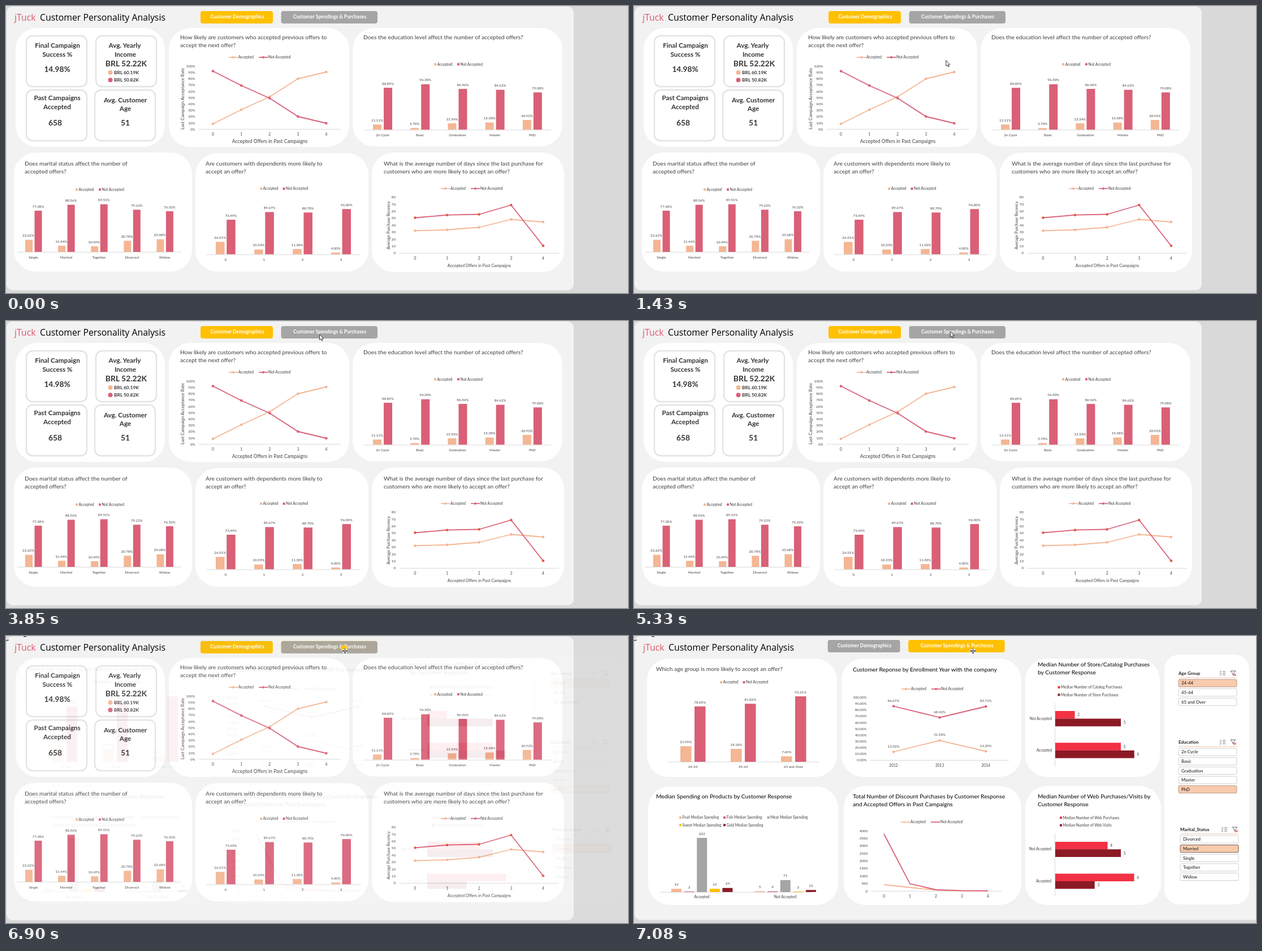
Write an HTML page that moves like this. It is 1100x509 px and loops after 8000 ms.

```html
<!DOCTYPE html>
<html lang="en">
<head>
<meta charset="utf-8">
<title>Customer Personality Analysis</title>
<style>
html, body { margin: 0; width: 100%; height: 100%; overflow: hidden; background: #d9d9d9; }
svg { display: block; font-family: Lato, "Noto Sans", sans-serif; }
.title { font-family: "Open Sans", "Noto Sans", sans-serif; }
</style>
</head>
<body>
<svg id="stage" width="1100" height="509" viewBox="0 0 1100 509"></svg>
<script>
const LOOP = 8000;
const PEACH = '#f4b693', ROSE = '#d96077', GREY = '#a5a5a5', GOLD = '#ffc000',
      RED = '#f23144', WINE = '#8c1a25', INK = '#404040', AXIS = '#d9d9d9';
const PAIR = ['Accepted', 'Not Accepted'];
const stage = document.getElementById('stage');
let layer = stage;

function add(tag, attrs, parent = layer) {
  const el = document.createElementNS('http://www.w3.org/2000/svg', tag);
  for (const key in attrs) el.setAttribute(key, attrs[key]);
  return parent.appendChild(el);
}
const group = (attrs = {}, parent = stage) => add('g', attrs, parent);
const rect = (x, y, width, height, fill, more) => add('rect', { x, y, width, height, fill, ...more });
const path = (d, stroke, width = 1, more) =>
  add('path', { d, fill: 'none', stroke, 'stroke-width': width, ...more });

// y is the middle of the capitals
function text(x, y, str, size, more = {}) {
  const el = add('text', { x, y: y + size * .36, 'font-size': size, fill: INK, ...more });
  el.textContent = str;
  return el;
}
const mid = (x, y, str, size = 6.2, more) => text(x, y, str, size, { 'text-anchor': 'middle', ...more });
const right = (x, y, str, size = 6.2) => text(x, y, str, size, { 'text-anchor': 'end' });
const bold = (x, y, str, size) => mid(x, y, str, size, { 'font-weight': 700, fill: '#333' });
const upright = (x, y, str, size) => mid(x, y, str, size, { transform: `rotate(-90 ${x} ${y})` });
const heading = (x, y, lines, fill = '#000') =>
  lines.forEach((line, i) => text(x, y + i * 14, line, 10.28, { fill }));

const card = (x1, y1, x2, y2, rx = 38) => rect(x1, y1, x2 - x1, y2 - y1, '#fff', { rx });
const key = (x, y, fill, label) => {
  rect(x, y - 2, 4, 4, fill);
  text(x + 5.5, y, label, 6.55);
};
const barKeys = (xa, xb, y) => { key(xa, y, PEACH, PAIR[0]); key(xb, y, ROSE, PAIR[1]); };
function lineKeys(xa, xb, y, dots = true) {
  [[xa, PEACH], [xb, ROSE]].forEach(([x, color], i) => {
    path(`M${x} ${y}h16.5`, color, 1.7);
    if (dots) add('circle', { cx: x + 8, cy: y, r: 2, fill: color });
    text(x + 17, y, PAIR[i], 6.55);
  });
}
const baseline = (x1, x2, y) => path(`M${x1} ${y}H${x2}`, AXIS);

function columns({ x, gap, shift, width, base, scale, low, high, names, nameX, nameY, skew = 0 }) {
  names.forEach((name, i) => {
    [[low, PEACH, 0], [high, ROSE, shift]].forEach(([values, color, dx]) => {
      const left = x + i * gap + dx, h = values[i] * scale;
      rect(left, base - h, width, h, color);
      mid(left + width / 2 + (dx ? 0 : skew), base - h - 7.6, values[i].toFixed(2) + '%');
    });
    mid(nameX + i * gap, nameY, name);
  });
}
function line(x, gap, ys, color, dot = color) {
  const pts = ys.map((y, i) => [x + i * gap, y]);
  path('M' + pts.join('L'), color, 1.8, { 'stroke-linejoin': 'round' });
  if (dot) pts.forEach(([cx, cy]) => add('circle', { cx, cy, r: 2.3, fill: dot }));
}
const scaleLabels = (x, y, step, count, label) => {
  for (let i = 0; i < count; i++) right(x, y + i * step, label(i));
};
const numbers = (x, gap, y, count, first = 0) => {
  for (let i = 0; i < count; i++) mid(x + i * gap, y, first + i, 6.6);
};

function header(x, y, dy, leftFill, rightFill) {
  text(x, y, 'jTuck', 15.8, { class: 'title', fill: '#e0566c' });
  text(x + 45, y, 'Customer Personality Analysis', 15.8, { class: 'title', fill: '#000' });
  const white = { 'font-weight': 700, fill: '#fff' };
  rect(344 + dy * .7, 9 + dy, 128, 22, leftFill, { rx: 4 });
  rect(486.5 + dy * .7, 9 + dy, 170.5, 22, rightFill, { rx: 4 });
  mid(409 + dy * .7, 19.3 + dy, 'Customer Demographics', 8.7, white);
  mid(572.5 + dy * .7, 19.3 + dy, 'Customer Spendings & Purchases', 8.7, white);
}

function demographics() {
  rect(0, 0, 1100, 509, '#d9d9d9');
  rect(1, 1, 1003, 503, '#f2f2f2', { rx: 11 });
  header(15, 20, 0, GOLD, GREY);
  card(17, 39, 281, 250); card(288, 39, 607, 250); card(613, 39, 984, 249);
  card(14, 260, 329, 471); card(335, 261, 641, 471); card(647, 260, 987, 472);

  [[36, 53], [159, 53], [36, 149], [157, 149]].forEach(([x, y]) =>
    rect(x, y, 107, 90, '#fff', { rx: 11, stroke: '#e3e3e3', 'stroke-width': 2.4 }));
  bold(91, 70, 'Final Campaign', 11.7); bold(91, 85.5, 'Success %', 11.7); bold(90.5, 112, '14.98%', 13.7);
  bold(210, 70, 'Avg. Yearly', 11.7); bold(211, 85.5, 'Income', 11.7); bold(212.5, 102, 'BRL 52.22K', 13.9);
  [[118, PEACH, 'BRL 60.19K'], [131.3, ROSE, 'BRL 50.82K']].forEach(([y, fill, label]) => {
    add('circle', { cx: 184.5, cy: y, r: 4, fill });
    bold(213, y, label, 8.3);
  });
  bold(90.5, 163, 'Past Campaigns', 11.7); bold(90.5, 178.5, 'Accepted', 11.7); bold(87, 207, '658', 13.8);
  bold(211, 166.5, 'Avg. Customer', 11.7); bold(211, 182, 'Age', 11.7); bold(211, 207, '51', 13.8);

  heading(308, 55.5, ['How likely are customers who accepted previous offers to', 'accept the next offer?'], INK);
  lineKeys(394, 447, 91);
  scaleLabels(334.5, 106.5, 11.2, 11, i => 100 - i * 10 + '%');
  upright(312, 164.5, 'Last Campaign Acceptance Rate', 7.8);
  baseline(341, 592, 218.5);
  line(366, 50.1, [209, 184, 161, 129, 117], PEACH);
  line(366, 50.1, [115.5, 141, 163.5, 196, 208], ROSE);
  numbers(366, 50.1, 227.5, 5);
  mid(466.5, 240, 'Accepted Offers in Past Campaigns', 8.7);

  heading(632, 55.5, ['Does the education level affect the number of accepted offers?'], INK);
  barKeys(757, 798, 103.3);
  columns({ x: 649, gap: 66.2, shift: 19, width: 15, base: 219.5, scale: .838, nameX: 666, nameY: 228.7,
    low: [11.11, 3.7, 13.54, 15.38, 20.92], high: [88.89, 96.3, 86.46, 84.62, 79.08],
    names: ['2n Cycle', 'Basic', 'Graduation', 'Master', 'PhD'] });
  baseline(633, 964, 220);

  heading(33, 279, ['Does marital status affect the number of', 'accepted offers?'], INK);
  barKeys(123, 164, 325.5);
  columns({ x: 34, gap: 58.1, shift: 16.5, width: 13, base: 436, scale: .943, nameX: 48.3, nameY: 445.3, skew: -1,
    low: [22.62, 11.44, 10.49, 20.78, 23.68], high: [77.38, 88.56, 89.51, 79.22, 76.32],
    names: ['Single', 'Married', 'Together', 'Divorced', 'Widow'] });
  baseline(20, 310, 436.5);

  heading(353, 279, ['Are customers with dependents more likely to', 'accept an offer?'], INK);
  barKeys(449, 489.5, 324);
  columns({ x: 371, gap: 68.1, shift: 19.2, width: 15.5, base: 440.5, scale: .837, nameX: 388.3, nameY: 449.8,
    low: [26.51, 10.33, 11.3, 4], high: [73.49, 89.67, 88.7, 96], names: [0, 1, 2, 3] });
  baseline(354, 627, 441);

  heading(668, 279, ['What is the average number of days since the last purchase for',
    'customers who are more likely to accept an offer?'], INK);
  lineKeys(769, 822, 323.7);
  scaleLabels(689, 339, 12.4, 9, i => 80 - i * 10);
  upright(676, 389, 'Average Purchase Recency', 7.3);
  baseline(696, 978, 438.5);
  line(723.5, 56.6, [398.5, 397, 392.5, 378.5, 383], PEACH);
  line(723.5, 56.6, [375.5, 370.7, 369.5, 353, 425.3], ROSE, '#e05a48');
  numbers(723.5, 56.6, 447.5, 5);
  mid(837, 460, 'Accepted Offers in Past Campaigns', 7.3);
}

function barPairs(x, bars, nameX, nameYs) {
  bars.forEach(([y, width, label, fill]) => {
    rect(x, y, width, 13.6, fill);
    mid(x + width + 6.6, y + 7, label, 6.6);
  });
  right(nameX, nameYs[0], PAIR[1], 6.55);
  right(nameX, nameYs[1], PAIR[0], 6.55);
}

function slicer(x, y, name, items, chosen, edge) {
  text(x, y, name, 8, { 'font-weight': 700, fill: '#222' });
  path(`M${x} ${y + 8}h103`, '#f3c3a5');
  [-3, 0, 3].forEach(dy =>
    path(`M${x + 73} ${y + dy}l1 1 2-2m2 1h5`, '#555', .8));
  path(`M${x + 92} ${y - 4}h9l-3.5 4v4l-2 -1.5v-2.500z`, '#555', .9);
  path(`M${x + 98} ${y + 1}l4 4m0-4l-4 4`, '#d0433c', 1);
  items.forEach((item, i) => {
    const cy = y + 17.6 + i * 16.6, on = item === chosen;
    rect(x, cy - 6.6, 103, 13.2, on ? '#f8cbad' : '#fff',
      { rx: 2, stroke: on ? edge : '#cfcfcf', 'stroke-width': 1 });
    text(x + 5, cy, item, 7.8, { fill: '#111' });
  });
}

function spendings() {
  rect(0, 0, 1100, 509, '#d9d9d9');
  rect(1, 0, 1130, 503.5, '#f2f2f2', { rx: 11 });
  header(16, 20.5, -2, GREY, GOLD);
  card(23, 40, 359, 250); card(367, 40, 685, 250); card(692, 40, 930, 250);
  card(25, 267, 361, 477); card(371, 266, 685, 477); card(692, 266, 932, 477);
  card(938, 33, 1088, 476, 26);

  heading(39, 58.5, ['Which age group is more likely to accept an offer?'], INK);
  barKeys(152, 192.500, 82);
  columns({ x: 82, gap: 89, shift: 25, width: 19.5, base: 223, scale: 1.257, nameX: 104, nameY: 232,
    low: [21.95, 18.18, 7.69], high: [78.05, 81.82, 92.31], names: ['24-44', '45-64', '65 and Over'] });
  baseline(60, 327, 223.5);

  heading(387, 59, ['Customer Reponse by Enrollment Year with the company']);
  lineKeys(473, 526, 94);
  scaleLabels(411.5, 109, 11.08, 11, i => (100 - i * 10).toFixed(2) + '%');
  baseline(418, 663, 220.5);
  [[[205.5, 185.3, 204.5], PEACH, ['13.33%', '31.58%', '14.29%']],
   [[124.500, 144.5, 125], ROSE, ['86.67%', '68.42%', '85.71%']]].forEach(([ys, color, labels]) => {
    line(459, 81.6, ys, color);
    ys.forEach((y, i) => mid(459 + i * 81.6, y - 10.2, labels[i]));
  });
  numbers(459, 81.6, 229.5, 3, 2012);

  heading(714, 50.5, ['Median Number of Store/Catalog Purchases', 'by Customer Response']);
  key(749.5, 91, RED, 'Median Number of Catalog Purchases');
  key(749.5, 104.3, WINE, 'Median Number of Store Purchases');
  path('M744.5 119V231', AXIS);
  barPairs(745, [[133, 34.5, 2, RED], [146.6, 116, 5, WINE], [189.3, 116, 5, RED], [203, 139.7, 6, WINE]],
    739, [146.5, 203]);

  heading(39, 284, ['Median Spending on Products by Customer Response']);
  const products = [['Fruit', PEACH, 80, 322], ['Fish', ROSE, 158, 322], ['Meat', GREY, 235.5, 322],
    ['Sweet', GOLD, 80, 335.3], ['Gold', WINE, 158, 335.3]];
  products.forEach(([name, fill, x, y]) => key(x, y, fill, name + ' Median Spending'));
  [[66, [19, 3, 322, 19, 24]], [213.5, [5, 4, 71, 3, 12]]].forEach(([x, values], n) => {
    values.forEach((v, i) => {
      const left = x + i * 22.6, h = v * .298;
      rect(left, 454 - h, 18, h, products[i][1]);
      mid(left + 9, 454 - h - 7.7, v, 6.4);
    });
    mid(x + 54, 463, PAIR[n], 6.55);
  });
  baseline(47, 313, 454.5);

  heading(387, 284, ['Total Number of Discount Purchases by Customer Response',
    'and Accepted Offers in Past Campaigns']);
  lineKeys(472, 525, 330, false);
  scaleLabels(413, 345.5, 13.35, 9, i => 4000 - i * 500);
  baseline(419, 650, 452.5);
  line(442, 46, [441, 446, 450.7, 451.8, 452], PEACH, null);
  line(442, 46, [351, 439.3, 450, 451.6, 452], ROSE, null);
  numbers(442, 46, 461.5, 5);

  heading(714, 284, ['Median Number of Web Purchases/Visits by', 'Customer Response']);
  key(753, 322.3, RED, 'Median Number of Web Purchases');
  key(753, 335.700, WINE, 'Median Number of Web Visits');
  path('M744.5 350V462', AXIS);
  barPairs(745, [[365, 92.5, 4, RED], [378.3, 116, 5, WINE], [421.5, 139.5, 6, RED], [434.8, 69.7, 3, WINE]],
    738, [378, 434.5]);

  slicer(963, 66, 'Age Group', ['24-44', '45-64', '65 and Over'], '24-44', '#b9998a');
  slicer(963, 188, 'Education', ['2n Cycle', 'Basic', 'Graduation', 'Master', 'PhD'], 'PhD', '#b9998a');
  slicer(966, 343, 'Marital_Status', ['Divorced', 'Married', 'Single', 'Together', 'Widow'], 'Married', '#6f5a50');
}

// steps: [time, value], held unless an easing is given
function play(el, prop, steps, easing = 'steps(1, end)') {
  const all = [[0, steps[0][1]], ...steps, [LOOP, steps.at(-1)[1]]];
  el.animate(all.map(([t, value]) => ({ offset: t / LOOP, [prop]: value, easing })),
    { duration: LOOP, iterations: Infinity });
}
const show = (el, from, to) => play(el, 'opacity', [[0, 0], [from, 1], [to, 0]]);

demographics();
layer = group();
spendings();
play(layer, 'opacity', [[0, 0], [6900, .08], [6990, .32], [7080, 1]]);

layer = group();
path('M0 8.5l5-1.500M31 .8h5', '#222', 1.2);
show(layer, 6350, LOOP);

layer = group();
path('M664 39.500q4-2.500 7-1', '#fff3b0', 2);
show(layer, 6090, 6690);

layer = group();
add('circle', { cx: 598, cy: 22, r: 6, fill: '#ffc61a' });
show(layer, 6900, 7080);

const cursor = group();
layer = group({}, cursor);
path('M.5 .5V10.500l2.300-2 1.600 3.500 1.700-.8-1.600-3.300h3z', '#222', .9, { fill: '#fff' });
show(layer, 70, 5880);
layer = group({}, cursor);
path('M3.200 8V1.500q1-1.500 2 0V5q3.500 0 5 1.200V10q-.500 2-1.500 4H4.500L.8 9q.6-1.500 2.400-.3', '#222', .9, { fill: '#fff' });
show(layer, 5880, 6800);
layer = group({}, cursor);
path('M.5 .5V9l2-1.800h4z', '#222', .8, { fill: '#fff' });
path('M-2 5.500h9M2.500 1v9M-2 5.500l1.500-1.500v3zM7 5.500l-1.500-1.500v3zM2.500 10l-1.500-1.500h3z', '#fff', 2.4);
path('M-2 5.500h9M2.500 1v9M-2 5.500l1.500-1.500v3zM7 5.500l-1.500-1.500v3zM2.500 10l-1.500-1.500h3z', '#222', .9);
show(layer, 6800, LOOP);

const route = [
  [60, 1092, 508], [820, 625, 144], [970, 551, 97], [1400, 551, 97], [1430, 551, 96],
  [1640, 592, 88], [1840, 594, 66], [2110, 594, 66], [2390, 546, 52], [2570, 554, 39],
  [3000, 554, 39], [3120, 554, 36], [3520, 554, 36], [3980, 554, 18], [5290, 554, 18],
  [5330, 558, 18], [5470, 680, 10], [5620, 802, 28], [5880, 661, 35], [6050, 661, 35],
  [6420, 603, 31], [6690, 597, 21]
];
play(cursor, 'transform', route.map(([t, x, y]) => [t, `translate(${x}px, ${y}px)`]), 'linear');
</script>
</body>
</html>
```
